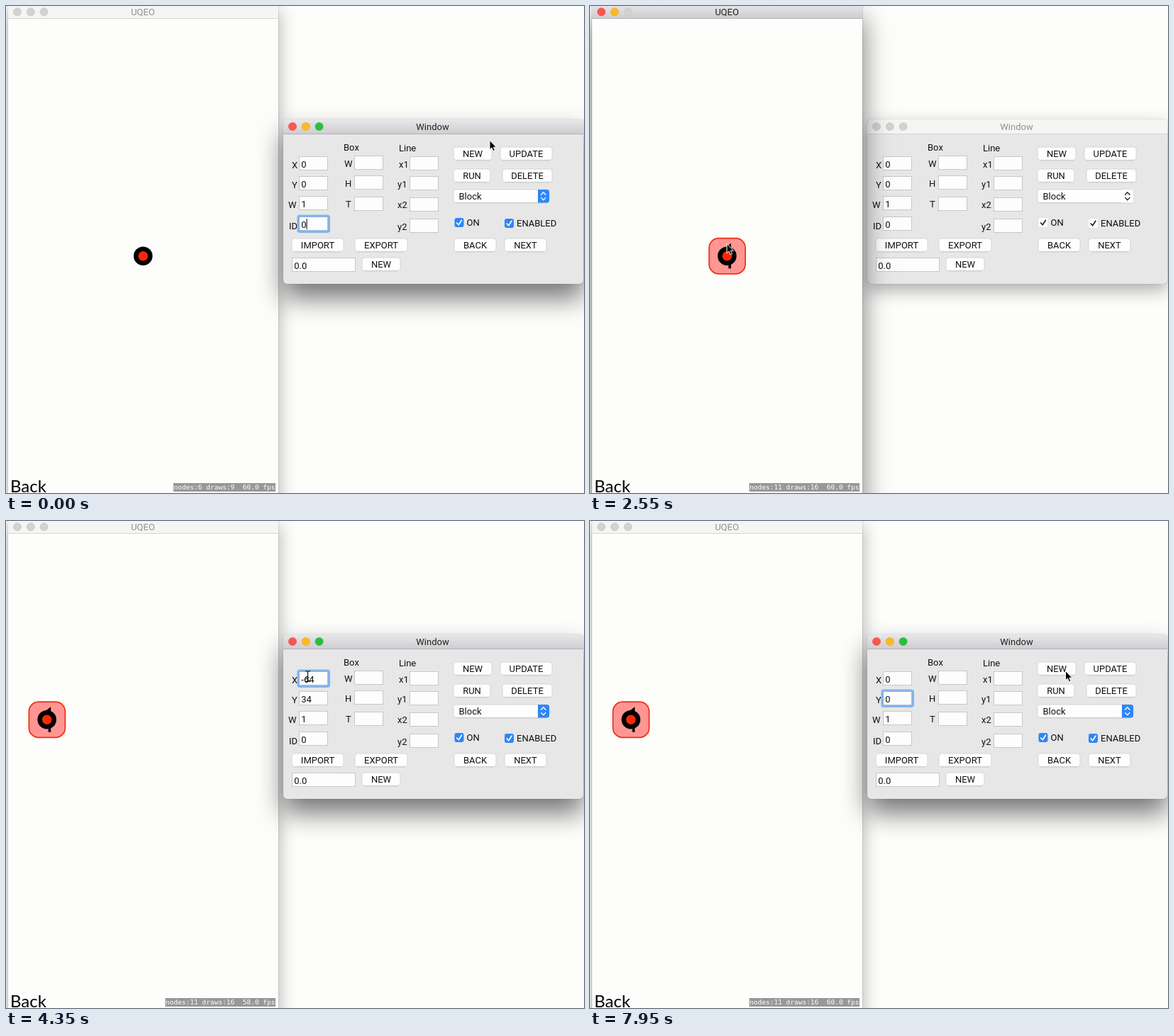
An HTML page that plays this animation: 815 px wide and 687 px high, repeating every 8000 ms.

```html
<!DOCTYPE html>
<html lang="en">
<head>
<meta charset="utf-8">
<title>Block editor</title>
<style>
html, body { margin: 0; width: 100%; height: 100%; overflow: hidden; background: #fdfdfc; }
#stage { position: relative; width: 815px; height: 687px; overflow: hidden; }
.win { position: absolute; background: #e7e7e7; box-shadow: 0 0 1px rgba(0,0,0,.45), 0 9px 24px rgba(0,0,0,.32); }
.win.active { z-index: 2; box-shadow: 0 0 1px rgba(0,0,0,.5), 0 20px 36px rgba(0,0,0,.54); }
#left { left: 3px; top: -3px; width: 381px; height: 700px; background: #fdfdfc; }
#right { left: 391px; top: 160px; width: 423px; height: 232px; border-radius: 5px; }
.bar { position: absolute; inset: 0 0 auto; box-sizing: border-box; height: 21px; border-bottom: 1px solid #d5d5d5; background: #f5f5f4; }
#right .bar { border-radius: 5px 5px 0 0; }
.active .bar { border-color: #b3b1b5; background: linear-gradient(#e8e7e9, #cfcdd1); }
svg { position: absolute; left: 0; top: 0; width: 815px; height: 687px; overflow: visible; }
#left svg { left: -3px; top: 3px; }
#right svg { left: -391px; top: -160px; }
#pointer { z-index: 3; }
text { font: 13px Roboto, sans-serif; fill: #111; white-space: pre; }
.title { fill: #929292; text-anchor: middle; }
.active .title { fill: #222; }
.mid { text-anchor: middle; }
.light { fill: #d2d2d2; stroke: #c4c4c4; stroke-width: .6; }
.active .red { fill: #fc5650; stroke: #e8504a; }
.active .amber { fill: #fdb924; stroke: #e6a823; }
.active .green { fill: #28c13c; stroke: #25b038; }
.field { fill: #fdfdfd; stroke: #c8c8c3; }
.button { fill: #fefefe; stroke: #cfcfcf; stroke-width: .8; }
.edge { stroke: #b8b8b8; stroke-width: .8; }
.accent { fill: #fefefe; }
.active .accent { fill: #2f86f6; }
.tick { fill: none; stroke: #222; stroke-width: 1.7; stroke-linecap: round; stroke-linejoin: round; }
.chevron { stroke-width: 1.3; }
.active .tick { stroke: #fff; }
.back { font: 24px Lato, sans-serif; fill: #000; }
.stats { font: 9.5px "DejaVu Sans Mono", monospace; fill: #fff; text-anchor: end; }
</style>
</head>
<body>
<div id="stage">
  <div class="win" id="left"><div class="bar"></div><svg>
    <g id="block">
      <g id="body">
        <rect x="-25.3" y="-25" width="51" height="50.2" rx="13.5" fill="#ff9692" stroke="#f52b12" stroke-width="1.7"/>
        <path d="M5.5-18V17.5H2V-8H-8Z"/>
      </g>
      <circle r="13.3"/><circle r="6.8" fill="#ff2607"/>
    </g>
    <text class="back" x="6" y="685.5">Back</text>
    <rect id="statsBox" y="673" height="12" fill="#989898"/>
    <text class="stats" id="stats" x="379.5" y="682"></text>
  </svg></div>
  <div class="win" id="right"><div class="bar"></div><svg></svg></div>
  <svg id="pointer">
    <path id="arrow" d="M0 0V13.2L3 10.5 5 15.3 7.3 14.3 5.4 9.7H9.4Z" fill="#000" stroke="#fff" stroke-width="1"/>
    <path id="beam" d="M-3.5-7.5Q0-7.5 0-5.5Q0-7.5 3.5-7.5M0-6V6M-3.5 7.5Q0 7.5 0 5.5Q0 7.5 3.5 7.5M-2 2H2" fill="none" stroke="#111" stroke-width="1.2"/>
  </svg>
</div>
<script>
const $ = id => document.getElementById(id);
const leftSvg = document.querySelector('#left svg');
const rightSvg = document.querySelector('#right svg');

function add(parent, tag, attrs, content = '') {
  const node = document.createElementNS('http://www.w3.org/2000/svg', tag);
  for (const key in attrs) node.setAttribute(key, attrs[key]);
  node.textContent = content;
  return parent.appendChild(node);
}
const label = (content, x, y, cls = '') => add(rightSvg, 'text', { x, y, class: cls }, content);

function titleBar(svg, title, center, y, lightX) {
  add(svg, 'text', { x: center, y: y + 4.7, class: 'title' }, title);
  ['red', 'amber', 'green'].forEach((color, i) => {
    const zoomOff = svg === leftSvg && i === 2;
    add(svg, 'circle', { cx: lightX + i * 18.8, cy: y, r: 5.6, class: 'light ' + (zoomOff ? '' : color) });
  });
}

const fields = {};
function field(id, x, y, value = '', width = 41) {
  add(rightSvg, 'rect', { x: x + .5, y: y + .5, width: width - 1, height: 19, class: 'field' });
  const mark = add(rightSvg, 'rect', { x: x + 3, y: y + 3, height: 15, fill: '#b3d7ff' });
  fields[id] = { x, y, mark, text: label(value, x + 3.3, y + 15.5) };
}

function button(name, x, y, width) {
  add(rightSvg, 'path', { d: `M${x + 3} ${y + 18.8}h${width - 6}`, class: 'edge' });
  add(rightSvg, 'rect', { x, y, width, height: 18.3, rx: 3.5, class: 'button' });
  label(name, x + width / 2, y + 14, 'mid');
}

function checkbox(name, x, y) {
  add(rightSvg, 'rect', { x, y, width: 13, height: 13, rx: 3, class: 'accent' });
  add(rightSvg, 'path', { d: `M${x + 3.2} ${y + 7}l2.5 2.8 4.2-6.5`, class: 'tick' });
  label(name, x + 17, y + 11.3);
}

titleBar(leftSvg, 'UQEO', 193, 8.3, 16);
titleBar(rightSvg, 'Window', 601.5, 170, 404);

[['X', 403, 229], ['Y', 403, 257], ['W', 398, 285], ['ID', 399, 315],
 ['Box', 476, 203.5], ['W', 477, 227], ['H', 478, 255], ['T', 479, 284],
 ['Line', 554, 204.5], ['x1', 554, 228], ['y1', 552, 256], ['x2', 552, 285], ['y2', 552, 316]]
  .forEach(args => label(...args));
[['X', 413, 212, '0'], ['Y', 413, 240, '0'], ['W', 413, 268, '1'], ['ID', 413, 297, '0'],
 ['boxW', 491, 211], ['boxH', 491, 239], ['boxT', 491, 269],
 ['x1', 569, 212], ['y1', 569, 240], ['x2', 569, 270], ['y2', 569, 300],
 ['value', 403, 355, '0.0', 90]].forEach(args => field(...args));
[['NEW', 631, 199, 54], ['UPDATE', 697, 199, 73], ['RUN', 631, 230, 52], ['DELETE', 700, 230, 70],
 ['IMPORT', 403, 328, 73], ['EXPORT', 492, 328, 74], ['BACK', 632, 328, 59], ['NEXT', 703, 328, 59],
 ['NEW', 502, 355, 54], ['', 631, 259, 135]].forEach(args => button(...args));
label('Block', 638.5, 273);
add(rightSvg, 'path', { d: 'M750 259h12.5a3.5 3.5 0 0 1 3.5 3.5v11.5a3.5 3.5 0 0 1-3.5 3.5H750Z', class: 'accent' });
add(rightSvg, 'path', { d: 'M754.6 266.2l3.2-3.4 3.2 3.4M754.6 270.4l3.2 3.4 3.2-3.4', class: 'tick chevron' });
checkbox('ON', 632.5, 299);
checkbox('ENABLED', 703, 300);

const ring = add(rightSvg, 'rect', { width: 43, height: 22, rx: 2, fill: 'none', stroke: '#86b4e9', 'stroke-width': 3.6 });
const caret = add(rightSvg, 'rect', { width: 1, height: 15, fill: '#000' });

// Timelines: [time, value...]
const LOOP = 8000, CREATE = 700, DRAG = 3200, DROP = 3700;
const HOME = [193.3, 352.7], PLACED = [57.7, 280.2], PX_PER_UNIT = 2.13;
const pointerPath = [[0, 682, 189.5], [500, 659, 207], [900, 659, 207], [1750, 418.5, 286.5],
  [2450, 193, 335.5], [DRAG, 193, 335.5], [DROP, 57.5, 263], [3800, 57.5, 263], [4250, 425.5, 219],
  [5950, 425.5, 219], [6500, 431.5, 251], [7350, 431.5, 251], [7900, 670.5, 211.5], [LOOP, 670.5, 211.5]];
const focus = [[0, 'ID'], [2500, ''], [4250, 'X'], [5700, 'boxW'], [6550, ''], [6700, 'Y']];
const carets = [[0, 'ID'], [2500, ''], [5000, 'X'], [5600, 'boxW'], [6550, ''], [7200, 'Y']];
const selected = [[0, ''], [4550, 'X'], [5000, ''], [6850, 'Y'], [7200, '']];
const rates = [[0, '60.0'], [2800, '59.9'], [3500, '58.0'], [6100, '59.3'], [7200, '60.0']];

const current = (list, t) => list.findLast(entry => entry[0] <= t);
const smooth = p => p * p * (3 - 2 * p);
const show = (node, on) => node.setAttribute('visibility', on ? 'inherit' : 'hidden');
const move = (node, x, y) => node.setAttribute('transform', `translate(${x} ${y})`);

function along(path, t) {
  const i = Math.max(1, path.findIndex(point => point[0] > t));
  const [t0, x0, y0] = path[i - 1], [t1, x1, y1] = path[i];
  const p = smooth((t - t0) / (t1 - t0));
  return [x0 + (x1 - x0) * p, y0 + (y1 - y0) * p];
}

function drawBlock(t) {
  const created = t >= CREATE;
  const p = smooth(Math.min(1, Math.max(0, (t - DRAG) / (DROP - DRAG))));
  const [x, y] = HOME.map((start, i) => start + (PLACED[i] - start) * p);
  move($('block'), x, y);
  show($('body'), created);
  const stats = `nodes:${created ? '11 draws:16' : '6 draws:9'}  ${current(rates, t)[1]} fps`;
  $('stats').textContent = stats;
  const width = stats.length * 5.72 + 1;
  $('statsBox').setAttribute('x', 380 - width);
  $('statsBox').setAttribute('width', width);
  fields.X.text.textContent = t < 5000 ? Math.round((x - HOME[0]) / PX_PER_UNIT) || 0 : 0;
  fields.Y.text.textContent = t < 7200 ? Math.round((HOME[1] - y) / PX_PER_UNIT) || 0 : 0;
}

function drawFocus(t) {
  const focused = fields[current(focus, t)[1]];
  show(ring, focused);
  if (focused) move(ring, focused.x - .8, focused.y - .8);

  const [since, id] = current(carets, t), target = fields[id];
  show(caret, target && (t - since) % 1000 < 500);
  if (target) move(caret, target.x + 3 + target.text.textContent.length * 7.6, target.y + 3);

  const marked = current(selected, t)[1];
  for (const id of ['X', 'Y']) {
    fields[id].mark.setAttribute('width', marked === id ? fields[id].text.textContent.length * 7.3 : 0);
  }
}

function drawPointer(t) {
  const [x, y] = along(pointerPath, t);
  const typing = (t >= 5000 && t < 5950) || (t >= 7200 && t < 7350);
  const inField = Object.values(fields).some(f => x > f.x && x < f.x + 41 && y > f.y && y < f.y + 20);
  const overField = inField && t > 3800;
  show($('arrow'), !typing && !overField);
  show($('beam'), !typing && overField);
  move($('arrow'), x, y);
  move($('beam'), x, y);
}

function draw(now) {
  const t = Math.floor(now % LOOP / 50) * 50;
  const leftActive = t >= 2500 && t < 4250;
  $('left').classList.toggle('active', leftActive);
  $('right').classList.toggle('active', !leftActive);
  drawBlock(t);
  drawFocus(t);
  drawPointer(t);
}

const start = performance.now();
function tick() {
  draw(performance.now() - start);
  requestAnimationFrame(tick);
}
tick();
</script>
</body>
</html>
```
